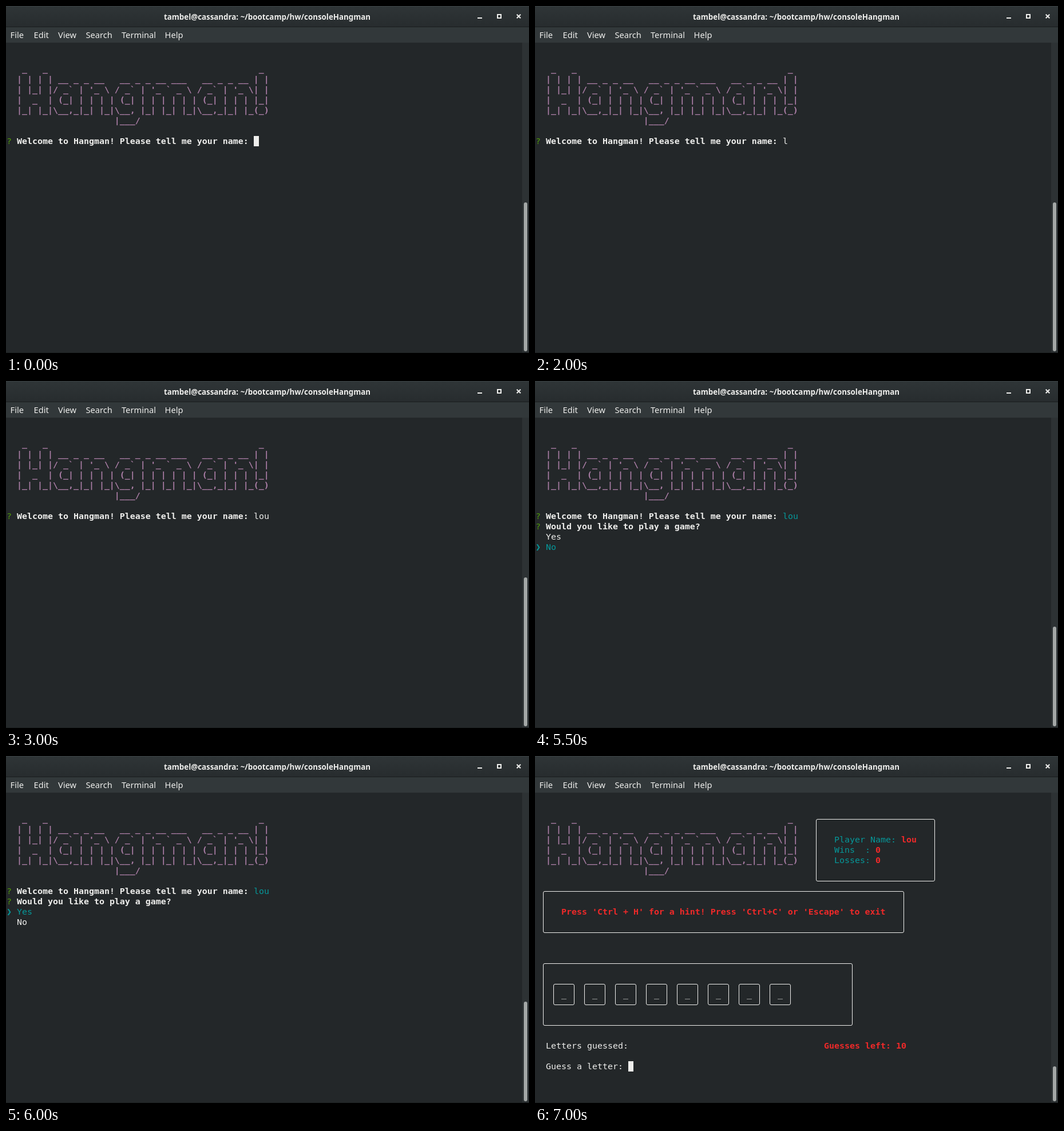
These frames come from a looping animation (914x606 px, 10000 ms). An HTML page:

```html
<!DOCTYPE html>
<html lang="en">
<head>
<meta charset="utf-8">
<title>Console Hangman</title>
<style>
  html, body { margin: 0; width: 100%; height: 100%; overflow: hidden; background: #232729; }
  #stage { position: relative; width: 914px; height: 606px; overflow: hidden; background: #232729; }
  svg { position: absolute; left: 0; top: 0; }
  .ui { font-family: "Noto Sans", "Open Sans", sans-serif; fill: #eeeeec; }
  .menu { font-size: 14.67px; }
  .title { font-size: 13.33px; font-weight: 700; text-anchor: middle; }
  .scene { position: absolute; inset: 0; visibility: hidden; }
  .scene.on { visibility: visible; }
  .t {
    position: absolute; white-space: pre; color: #eeeeec;
    font: 14.95px/18px "DejaVu Sans Mono", monospace;
    font-variant-ligatures: none;
  }
  .b { font-weight: 700; }
  .magenta { color: #ad7fa8; }
  .green { color: #4e9a06; }
  .cyan { color: #06989a; }
  .red { color: #ef2929; }
  .dim { color: #979a99; }
  .cursor { position: absolute; width: 9px; height: 18px; background: #eeeeec; }
  .box { position: absolute; box-sizing: border-box; border: 1px solid #eeeeec; border-radius: 3px; }
  #thumb { position: absolute; left: 905px; width: 6px; bottom: 3px; border-radius: 3px; background: #a3a7a6; }
</style>
</head>
<body>
<div id="stage">
  <svg width="914" height="606" viewBox="0 0 914 606">
    <defs>
      <linearGradient id="bar" x1="0" y1="0" x2="0" y2="1">
        <stop offset="0" stop-color="#2f3537"/>
        <stop offset="1" stop-color="#272c2e"/>
      </linearGradient>
    </defs>
    <rect width="914" height="37" fill="url(#bar)"/>
    <rect width="914" height="1" fill="#3a4143"/>
    <rect y="36" width="914" height="1" fill="#1a1d1e"/>
    <rect y="37" width="914" height="27" fill="#32383a"/>
    <rect x="902" y="64" width="12" height="542" fill="#2d3234"/>
    <rect y="605" width="914" height="1" fill="#1b1f20"/>
    <text class="ui title" x="456.5" y="24">tambel@cassandra: ~/bootcamp/hw/consoleHangman</text>
    <g class="ui menu">
      <text x="7.6" y="56">File</text>
      <text x="48.6" y="56">Edit</text>
      <text x="91" y="56">View</text>
      <text x="139.5" y="56">Search</text>
      <text x="202" y="56">Terminal</text>
      <text x="277.6" y="56">Help</text>
    </g>
    <g fill="none" stroke="#eeeeec" stroke-width="2">
      <path d="M824 21h8M859 15h6v6h-6z"/>
      <path d="M892.7 14.7l6.6 6.6M899.3 14.7l-6.6 6.6"/>
    </g>
  </svg>
  <div id="screen"></div>
  <div id="thumb"></div>
</div>
<script>
const CELL_W = 9, CELL_H = 18, LEFT = 1, TOP = 65, LOOP = 10000;
const PLAYER = "lou";
const BANNER = String.raw`
  _   _                                         _
 | | | | __ _ _ __   __ _ _ __ ___   __ _ _ __ | |
 | |_| |/ _${"`"} | '_ \ / _${"`"} | '_ ${"`"} _ \ / _${"`"} | '_ \| |
 |  _  | (_| | | | | (_| | | | | | | (_| | | | |_|
 |_| |_|\__,_|_| |_|\__, |_| |_| |_|\__,_|_| |_(_)
                    |___/`.slice(1);

const screen = document.getElementById("screen");
const thumb = document.getElementById("thumb");
const px = n => n + "px";

function place(parent, cls, row, col) {
  const el = document.createElement("div");
  el.className = cls;
  el.style.left = px(LEFT + col * CELL_W);
  el.style.top = px(TOP + row * CELL_H);
  parent.append(el);
  return el;
}

function text(parent, row, col, str, cls = "") {
  place(parent, "t " + cls, row, col).textContent = str;
}

const cursor = (parent, row, col) => place(parent, "cursor", row, col);

// Lines run through the centres of the cells, as box-drawing glyphs do.
function box(parent, row, col, rows, cols) {
  const s = place(parent, "box", row + 0.5, col + 4 / 9).style;
  s.width = px(cols * CELL_W + 1);
  s.height = px(rows * CELL_H + 1);
}

function ask(parent, row, question) {
  text(parent, row, 0, "?", "green");
  text(parent, row, 2, question, "b");
}

function askName(parent) {
  ask(parent, 9, "Welcome to Hangman! Please tell me your name:");
}

function typing(count) {
  return el => {
    askName(el);
    if (count) text(el, 9, 48, PLAYER.slice(0, count));
    else cursor(el, 9, 48);
  };
}

function choice(picked, hint = "") {
  return el => {
    askName(el);
    text(el, 9, 48, PLAYER, "cyan");
    ask(el, 10, "Would you like to play a game?");
    text(el, 10, 33, hint, "dim");
    ["Yes", "No"].forEach((label, i) => {
      const on = i === picked;
      if (on) text(el, 11 + i, 0, "❯", "cyan");
      text(el, 11 + i, 2, label, on ? "cyan" : "");
    });
  };
}

function game(el) {
  box(el, 2, 54, 6, 23);
  [["Player Name: ", PLAYER], ["Wins  : ", "0"], ["Losses: ", "0"]].forEach(([label, value], i) => {
    text(el, 4 + i, 58, label, "cyan");
    text(el, 4 + i, 58 + label.length, value, "b red");
  });
  box(el, 9, 1, 4, 70);
  text(el, 11, 5, "Press 'Ctrl + H' for a hint! Press 'Ctrl+C' or 'Escape' to exit", "b red");
  box(el, 16, 1, 6, 60);
  for (let i = 0; i < 8; i++) {
    box(el, 18, 3 + i * 6, 2, 4);
    text(el, 19, 5 + i * 6, "_");
  }
  text(el, 24, 2, "Letters guessed:");
  text(el, 24, 56, "Guesses left: 10", "b red");
  text(el, 26, 2, "Guess a letter:");
  cursor(el, 26, 18);
}

// start time, scrollbar top, content
const steps = [
  [0, 343, typing(0)],
  [2000, 343, typing(1)],
  [2500, 343, typing(2)],
  [3000, 343, typing(3)],
  [3500, 429, choice(0, "(Use arrow keys)")],
  [5500, 429, choice(1)],
  [6000, 429, choice(0)],
  [7000, 542, game]
];

text(document.getElementById("stage"), 2, 1, BANNER, "b magenta");
const scenes = steps.map(([, , draw]) => {
  const el = document.createElement("div");
  el.className = "scene";
  draw(el);
  screen.append(el);
  return el;
});

const begin = performance.now();
let shown = -1;

function tick() {
  const t = (performance.now() - begin) % LOOP;
  const now = steps.findLastIndex(([start]) => t >= start);
  if (now !== shown) {
    scenes.forEach((el, i) => el.classList.toggle("on", i === now));
    thumb.style.top = px(steps[now][1]);
    shown = now;
  }
  requestAnimationFrame(tick);
}
tick();
</script>
</body>
</html>
```
